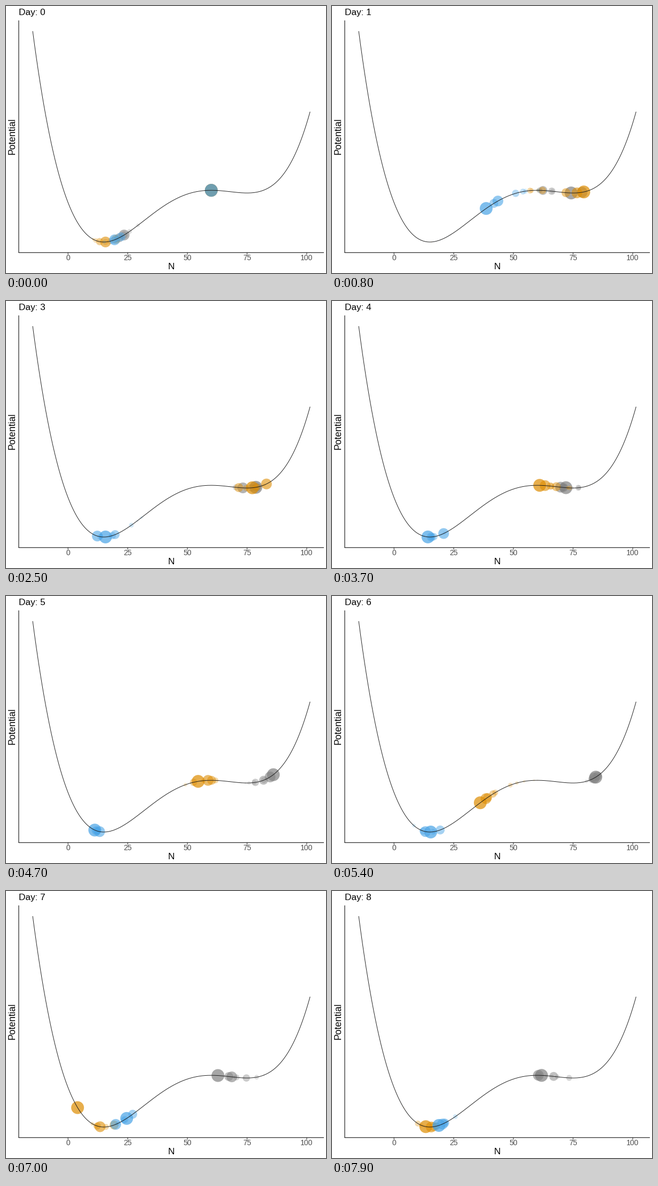
Recreate the animation shown at these times as a matplotlib script. Size 600x500 px, loop 8000 ms.

```python
import numpy as np
import matplotlib.pyplot as plt
from matplotlib.animation import FuncAnimation

W, H, DPI = 600, 500, 100
FRAMES, INTERVAL = 80, 100
FRAMES_PER_DAY = 199 / 21
WAKE = 17.5          # frames until a trailing ball vanishes
LEAD = 8             # steps of trail already present at the start
RADIUS, ALPHA = 12, 0.7
PX = 72 / DPI        # points per pixel
FONT = "Liberation Sans"

# Key positions of each ball; between them it jitters around a straight trend
KEY_STEPS = [-1, 0, 4, 8, 25, 37, 47, 61, 79]
BALLS = [
    ((128, 128, 128), [23.5, 60, 61, 74.2, 78.7, 72, 86, 75.6, 61.8]),
    ((222, 140, 0), [15.7, 60, 57, 79.5, 77.2, 61, 54.5, 12.2, 13.3]),
    ((72, 163, 230), [19.5, 60, 54, 38.6, 15.7, 14.2, 11.2, 21.3, 18.8]),
]


def to_x(n):
    return 116.3 + 4.476 * np.asarray(n)


def to_y(n):
    """Double well with its flat points at 15, 60 and 75."""
    u = np.asarray(n) - 15
    return 442 - (u**4 / 4 - 35 * u**3 + 1350 * u**2) / 5880


def build_path(keys, rng):
    """Trend through the keys plus noise that is zero at each key."""
    steps = np.arange(-LEAD, FRAMES)
    noise = rng.normal(0, 3.5, len(steps))
    noise[np.isin(steps, KEY_STEPS)] = 0
    return np.clip(np.interp(steps, KEY_STEPS, keys) + noise, 4, 86)


rng = np.random.default_rng(4)
paths = [build_path(keys, rng) for _, keys in BALLS]

fig = plt.figure(figsize=(W / DPI, H / DPI), dpi=DPI, facecolor="white")
ax = fig.add_axes([0, 0, 1, 1])
ax.set_xlim(0, W)
ax.set_ylim(H, 0)
ax.axis("off")


def line(x, y, color="black", width=1.05, z=1):
    ax.plot(x, y, color=color, lw=width * PX, zorder=z,
            solid_capstyle="butt", snap=False)


def label(x, y, text, size=17.3, color="black", **kw):
    return ax.text(x, y, text, fontsize=size * PX, color=color,
                   family=FONT, va="baseline", **kw)


line([23.9, 23.9], [27, 462])
line([23.5, 596], [461.8, 461.8])
for n in range(0, 101, 25):
    line([to_x(n)] * 2, [462, 465.5], "#333333")
    label(to_x(n), 476.3, str(n), 14, "#4D4D4D", ha="center")
label(310, 493, "N", ha="center")
label(16, 244, "Potential", 17.6, ha="center", rotation=90,
      rotation_mode="anchor")
title = label(23.5, 17, "Day: 0")

grid = np.linspace(-14.8, 101.4, 300)
line(to_x(grid), to_y(grid), "#1A1A1A", 0.95, 3)
dots = ax.scatter([], [], linewidths=0, zorder=2)


def update(i):
    now = i + LEAD
    age = np.arange(min(now, int(WAKE)), -1, -1)
    fade = (1 - age / WAKE) ** 3
    pos, size, rgba = [], [], []
    for (color, _), path in zip(BALLS, paths):
        n = path[now - age]
        rgb = np.tile(np.array(color) / 255, (len(age), 1))
        pos.append(np.column_stack([to_x(n), to_y(n)]))
        size.append((2 * RADIUS * fade * PX) ** 2)
        rgba.append(np.column_stack([rgb, ALPHA * fade]))
    dots.set_offsets(np.vstack(pos))
    dots.set_sizes(np.concatenate(size))
    dots.set_facecolors(np.vstack(rgba))
    title.set_text(f"Day: {round(i / FRAMES_PER_DAY)}")
    return dots, title


anim = FuncAnimation(fig, update, frames=FRAMES, interval=INTERVAL,
                     repeat=True, repeat_delay=0, blit=False)
plt.show()
```
